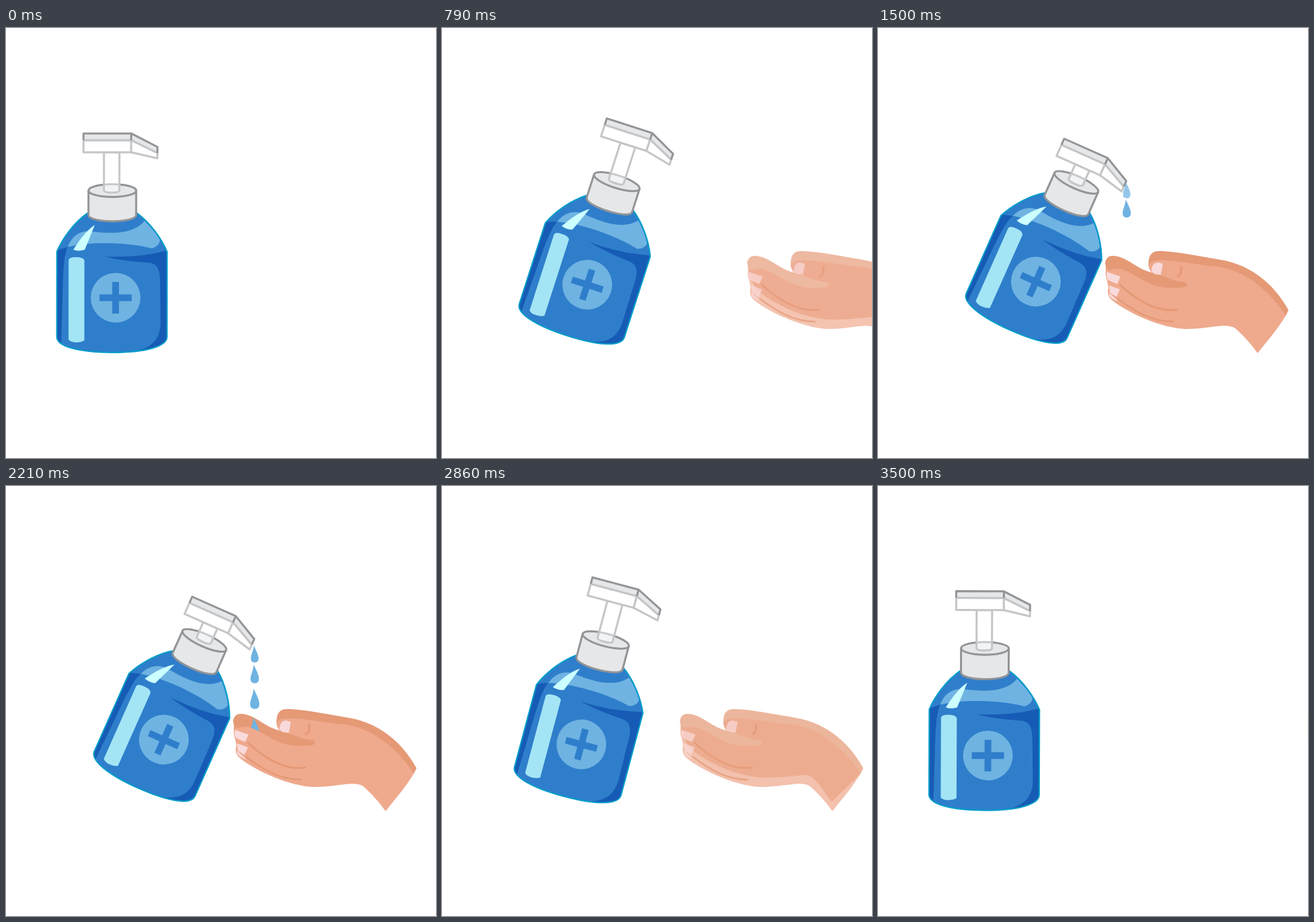
Write an HTML page that moves like this. It is 640 by 640 pixels and loops after 3.57 s.

```html
<!DOCTYPE html>
<html lang="en">
<head>
<meta charset="utf-8">
<title>Hand sanitizer</title>
<style>
  html, body { margin: 0; width: 100%; height: 100%; overflow: hidden; background: #fff; }
  svg { display: block; width: 100%; height: 100%; }
  .mid { fill: #2f7ecb; }
  .deep { fill: #165bb5; }
  .light { fill: #6fb3e2; }
  .grey { fill: #e6e7e9; stroke: #929497; }
  .clear { fill: #fff; stroke: #c4c5c7; }
  .skin { fill: #efa98d; }
  .shade { fill: #e59975; }
  .nail { fill: #f9dadb; }
  .crease { fill: none; stroke: #e59975; stroke-linecap: round; }
</style>
</head>
<body>
<svg viewBox="0 0 640 640">
  <g id="bottle" stroke-width="3" stroke-linejoin="round">
    <g stroke="none">
      <path class="mid" d="M122 275C100 290 83 315 75.500 333V460C76 474 108 483 158 483S239 474 239.500 460V333C232 315 215 290 194 275Z"/>
      <path class="deep" d="M76 331L92 326C86 336 85 360 84 400L82 470C77 466 76 462 76 460Z"/>
      <path class="deep" d="M146 340C180 342 215 338 239 331V460C236 474 215 480 186 482C215 478 229 465 230 440L229 372C228 355 222 350 210 349C190 348 165 345 146 340Z"/>
      <path class="light" d="M92 326C98 308 112 302 125 302.500C150 306 188 309 206 287C215 296 224 306 229 316Q228 325 217 328C180 318 120 318 92 326Z"/>
      <path fill="#cff" d="M132 293C118 302 108 318 100 330Q109 333 117 330Z"/>
      <path fill="#a3e5f5" d="M93 346Q93 341 104 341T116.500 346V465Q112 468 104 468T93 464Z"/>
      <circle class="light" cx="163" cy="401.500" r="37"/>
      <path class="mid" d="M158 378h10v18.500h19v10h-19V425h-10v-18.500h-19v-10h19Z"/>
    </g>
    <path fill="none" stroke="#009dc9" stroke-width="2" d="M122 275C100 290 83 315 75.500 333V460C76 474 108 483 158 483S239 474 239.500 460V333C232 315 215 290 194 275"/>
    <path class="grey" d="M122.500 242V278C122.500 291 193.500 291 193.500 278V242Z"/>
    <ellipse class="grey" cx="158" cy="242" rx="35.500" ry="9.500"/>
    <path id="stem" class="clear" fill-opacity=".5"/>
    <g id="head">
      <path class="clear" d="M115 167H186V185H115Z"/>
      <path class="clear" d="M186 167L225 186V194L186 185Z"/>
      <path fill="#e6e7e9" d="M115 157H186L225 177V186L186 167H115Z"/>
      <path fill="none" stroke="#c4c5c7" d="M115 167H186L225 186"/>
      <path fill="none" stroke="#929497" d="M115 167V157H186V167M186 157L225 177V186"/>
    </g>
  </g>

  <g id="back">
    <path class="shade" d="M338 350C339 342 344 339 350 339C372 341 383 357 404 363L425 369L409 364C402 359 402 352 403 346C404 336 410 332 418 332C440 332 475 339 510 345C560 353 594 388 611 420L607 428L564 470C552 455 540 431 525 430C505 432 485 434 462 434C425 432 385 416 352 390L342 371Z"/>
  </g>
  <g id="drops"></g>
  <g id="front" stroke-width="3">
    <path class="skin" d="M339 357C343 363 349 358 357 358C374 360 390 376 415 384C430 388 452 387 458 385C462 382 460 379 455 378C440 377 430 371 420 368C412 368 404 364 403.500 356C403 350 407 346 414 346C440 344 470 352 505 355C550 360 588 398 607 428C595 448 580 465 565 484C556 471 544 458 533 448C527 443 518 443 510 443.500C494 445 478 448 458 448C424 447 372 425 347 404C342 399 341 393 343 386L341 376C338 370 339 363 339 357Z"/>
    <path class="nail" d="M407 361C408 353 411 349 417 349L424 351L421 367C414 367 408 366 407 361Z"/>
    <path class="nail" d="M341 363L361 370L356 381L344 376C340 374 339 368 341 363Z"/>
    <path class="nail" d="M344 383L360 389L355 400L345 394Z"/>
    <path class="nail" d="M344 394L358 407C351 405 343 401 344 394Z"/>
    <path class="crease" d="M451 355C453 362 450 368 446 369.500"/>
    <path class="crease" d="M360 382C380 401 412 424 445 419"/>
    <path class="crease" stroke-width="2.500" d="M357 403C380 420 405 437 439 437"/>
  </g>
</svg>
<script>
  const LOOP = 3570, STEPS = 50, PRESS = 33, FAR = 303;
  const $ = id => document.getElementById(id);
  const clamp = x => Math.max(0, Math.min(1, x));
  const ramp = (f, a, b) => clamp((f - a) / (b - a));
  const ease = (f, a, b) => Math.sin(ramp(f, a, b) * Math.PI / 2) ** 2;
  const pulse = (f, a, b, c, d) => ease(f, a, b) * (1 - ease(f, c, d));

  const drops = Array.from({ length: 5 }, () => {
    const p = document.createElementNS('http://www.w3.org/2000/svg', 'path');
    p.setAttribute('class', 'light');
    p.setAttribute('d', 'M-1.500-30C1-24 7-14 7-7C7-2 4 0 0 0S-6.500-2.500-6.500-7C-6.500-14-2-20-1.500-30Z');
    return $('drops').appendChild(p);
  });

  function drawBottle(f) {
    const p = pulse(f, -0.5, 16.9, 32.7, 50);
    const down = PRESS * pulse(f, 14, 19.5, 32.5, 36.5);
    const y = p * (15.5 * p - 34.7);
    $('bottle').setAttribute('transform', `translate(${105.6 * p} ${y}) rotate(${24 * p} 157.5 320)`);
    $('head').setAttribute('transform', `translate(0 ${down})`);
    $('stem').setAttribute('d', `M145.500 ${185 + down}V242Q146 245 157 245T168.500 242V${185 + down}Z`);
  }

  function drawHand(f) {
    const x = FAR * (1 - pulse(f, 3.3, 16.7, 38.3, 49.8));
    const alpha = ramp(f, -1, 16.7) * (1 - ramp(f, 36, 50));
    for (const id of ['back', 'front']) {
      const g = $(id);
      g.setAttribute('transform', `translate(${x} 0)`);
      // Each layer fades on its own, so overlaps stay denser.
      g.setAttribute('fill-opacity', alpha);
      g.setAttribute('stroke-opacity', alpha);
    }
  }

  function drawDrops(f) {
    const fade = 1 - ramp(f, 32, 35);
    drops.forEach((drop, n) => {
      const u = 4.49 + 0.261 * (f - 21) - n;
      const seen = u > 3 && u < 7.6;
      const size = (26 + (u - 4.1) * 2.5) / 30;
      drop.setAttribute('fill-opacity', seen ? clamp((u - 3) / 0.65) * fade : 0);
      drop.setAttribute('transform', `translate(370 ${210 + 3.57 * u * u}) scale(${Math.max(0.1, size)})`);
    });
  }

  const start = performance.now();
  function tick(now) {
    const t = Math.max(0, now - start) % LOOP;
    const f = Math.floor(t / LOOP * STEPS + 0.03);
    drawBottle(f);
    drawHand(f);
    drawDrops(f);
    requestAnimationFrame(tick);
  }
  tick(start);
</script>
</body>
</html>
```
